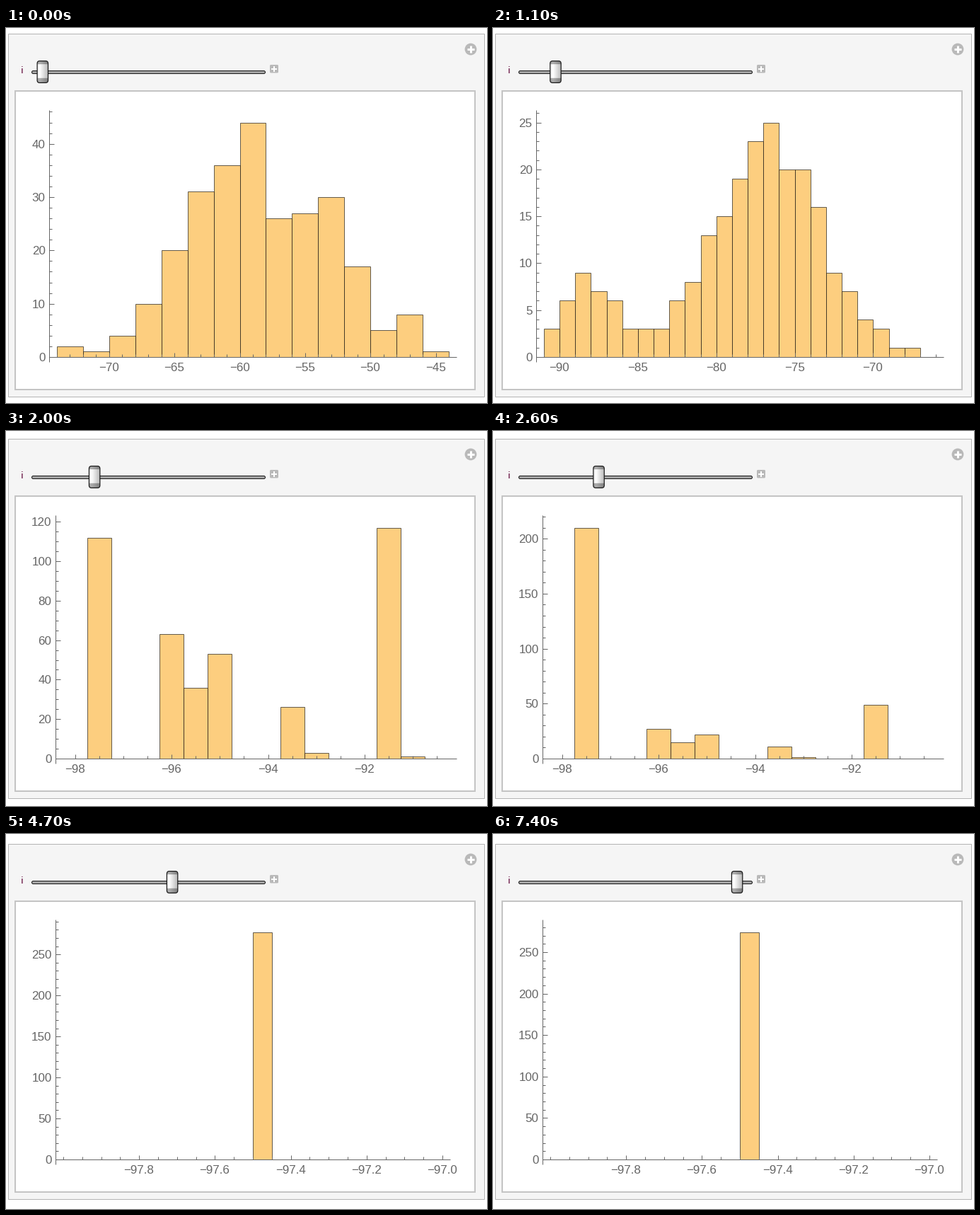
A matplotlib script for the animation above (8000 ms loop, 680 by 530 pixels).

```python
import math
import numpy as np
import matplotlib.pyplot as plt
from matplotlib.animation import FuncAnimation
from matplotlib.collections import LineCollection
from matplotlib.patches import Circle, FancyBboxPatch, Rectangle

W, H, DPI = 680, 530, 100
PX = 72 / DPI  # points per pixel
INTERVAL, FRAMES = 100, 80
LAST_STEP = 24

FILL = "#fdce7f"
EDGE = (0, 0, 0, 0.6)
AXIS = "#666666"
ICON = "#b9b9b9"

# icon centre y, plot box bottom
ROOMY, RAISED, TALL = (30, 511), (29, 512), (28, 514)
SHORT, MIDDLE, LOW = (33, 509), (32, 511), (36, 506)

fig = plt.figure(figsize=(W / DPI, H / DPI), dpi=DPI, facecolor="white")
ax = fig.add_axes([0, 0, 1, 1])


# --- histograms -----------------------------------------------------------

def hist(layout, lo, hi, width, counts, xticks, yticks, left=61, right=637, digits=0):
    return dict(layout=layout, lo=lo, hi=hi, width=width, counts=counts,
                xticks=xticks, yticks=yticks, left=left, right=right, digits=digits)


def humps(layout, lo, hi, width, peak, parts, ystep=(5, 1), jitter=0):
    """Histogram of a sum of bell curves (height, mean, spread)."""
    x = np.arange(lo, hi, width) + width / 2
    y = sum(a * np.exp(-((x - m) / s) ** 2 / 2) for a, m, s in parts)
    y = y * np.random.default_rng(4).uniform(1 - jitter, 1 + jitter, len(x))
    return hist(layout, lo, hi, width, np.rint(y * peak / y.max()), (5, 1), ystep)


def early():
    return humps(ROOMY, -74, -44, 2, 44,
                 [(36, -60.8, 3.9), (25, -53, 2), (11, -59, 0.7),
                  (8, -47, 1), (2, -73, 0.5)], (10, 2))


def sinking():
    return humps(RAISED, -88, -61, 1, 29,
                 [(25, -73, 3.4), (5, -65, 1.6), (4, -81, 1.8), (9, -76, 0.7),
                  (5, -73.5, 0.4), (3, -87.5, 0.3)])


def drifting(s):
    """Main hump moves left while a second one grows near the lower end."""
    return humps(ROOMY, round(-88 - 4 * s), round(-61 - 7 * s), 1, 27 - 3 * s,
                 [(24, -73 - 5.5 * s, 3.4), (14 * s, -88, 1.7)], jitter=0.15)


def split():
    return humps(TALL, -92, -68, 1, 24,
                 [(20, -78.5, 2.9), (17, -88.1, 1.1), (9, -85, 0.8),
                  (16, -91.5, 0.4), (9, -81.5, 0.5), (4, -78.5, 0.4), (6, -74.5, 0.4)])


def clusters(step):
    """Upper levels empty geometrically into the lowest one."""
    rest = 0.65 ** (step - 6)
    levels = {-97.5: 282 / rest - 170, -96: 63, -95.5: 36, -95: 53,
              -93.5: 26, -93: 3, -91.5: 117, -91: 1}
    last = step == 9
    lo, hi = -98.25, -94.25 if last else -90.25
    counts = np.zeros(round((hi - lo) * 2))
    for level, n in levels.items():
        if level < hi:
            counts[int((level - lo) * 2)] = round(n * rest)
    yticks = (50, 10) if counts.max() > 130 else (20, 5)
    return hist(MIDDLE if last else SHORT, lo, hi, 0.5, counts,
                (1 if last else 2, 0.5), yticks, left=70)


def single(step):
    j = (step - 10) // 5
    return hist(LOW, -98, -97, 0.05, [0] * 10 + [282 - j * (6 - j)], (0.2, 0.05),
                (50, 10), left=70, right=628, digits=1)


def hist_at(step):
    if step == 0:
        return early()
    if step == 1:
        return sinking()
    if step < 4:
        return drifting((step - 1) / 3)
    if step == 4:
        return split()
    return clusters(step) if step < 10 else single(step)


# --- drawing --------------------------------------------------------------
# Whole numbers name pixel rows and columns; thin straight lines snap to them.

def rect(x0, y0, x1, y1, face, edge, lw=1, z=1):
    ax.add_patch(Rectangle((x0, y0), x1 - x0, y1 - y0, facecolor=face,
                           edgecolor=edge, linewidth=lw * PX, zorder=z))


def rounded(x, y, w, h, r, face, edge="none", lw=0, z=1):
    box = FancyBboxPatch((x - w / 2, y - h / 2), w, h,
                         boxstyle=f"round,pad=0,rounding_size={r}",
                         facecolor=face, edgecolor=edge, linewidth=lw * PX, zorder=z)
    ax.add_patch(box)
    return box


def plus(x, y, arm, lw):
    for dx, dy in ((arm, 0), (0, arm)):
        ax.plot([x - dx, x + dx], [y - dy, y + dy], color="white", lw=lw * PX,
                solid_capstyle="butt", zorder=4)


def label(x, y, s, ha):
    ax.text(x, y, s, ha=ha, va="baseline", color=AXIS,
            family="Liberation Sans", size=17 * PX, zorder=4)


def multiples(step, lo, hi):
    first, last = math.ceil(lo / step - 1e-6), math.floor(hi / step + 1e-6)
    return [k * step for k in range(first, last + 1)]


def is_major(v, step):
    return abs(v / step - round(v / step)) < 1e-6


def number(v, digits=0):
    return f"{v:.{digits}f}".replace("-", "\u2212")


def draw_panel(icon_y, box_bottom):
    rect(3, icon_y - 22, 676, box_bottom + 10, "#f5f5f5", "#b4b4b4")
    rect(13, icon_y + 59, 663, box_bottom, "white", "#c4c4c4", lw=2)
    ax.add_patch(Circle((657, icon_y), 8.4, facecolor=ICON, edgecolor="none", zorder=3))
    plus(657, icon_y, 5, 3)
    rounded(379, icon_y + 27.7, 12, 11.5, 1.5, ICON, z=3)
    plus(379, icon_y + 27.7, 4, 2)
    ax.text(20.5, icon_y + 34, "i", family="DejaVu Sans", size=13 * PX,
            color="#5c0034", va="baseline", zorder=3)


def knob_shade():
    """Light body fading to grey on the right, with darker caps."""
    x = np.linspace(0, 1, 16)
    body = 1 - 0.27 * np.abs(x - 0.22) / 0.78
    shade = np.tile(body, (30, 1))
    shade[:5] *= 0.68
    shade[-6:] *= 0.68
    return np.dstack([shade] * 3)


KNOB = knob_shade()


def draw_slider(x, icon_y):
    rounded(201.5, icon_y + 32.5, 330, 4, 2, "#a3a3a3", "#1c1c1c", 1, z=3)
    y = icon_y + 32
    outline = rounded(x, y, 15.4, 30.8, 3.5, "none", "#161616", 1.2, z=6)
    shade = ax.imshow(KNOB, extent=(x - 7.7, x + 7.7, y + 15.4, y - 15.4),
                      aspect="auto", interpolation="bilinear", zorder=5)
    shade.set_clip_path(outline)


def draw_hist(h):
    left, right = h["left"], h["right"]
    base = h["layout"][1] - 46
    peak = max(h["counts"])
    sx = (right - left - 22) / (h["hi"] - h["lo"])
    sy = 0.5755 * (right - left) / peak
    top = round(base - sy * peak - 17.5)

    def px(v):
        return round(left + 11 + (v - h["lo"]) * sx)

    def py(v):
        return round(base - v * sy)

    for k, n in enumerate(h["counts"]):
        if n:
            x = h["lo"] + k * h["width"]
            rect(px(x), py(n), px(x + h["width"]), base, FILL, EDGE, z=2)

    lines = [[(left, base), (right, base)], [(left, top), (left, base + 7)]]

    major, minor = h["xticks"]
    for v in multiples(minor, h["lo"] - 9 / sx, h["hi"] + 9 / sx):
        x = px(v)
        labelled = is_major(v, major) and x > left + 20
        lines.append([(x, base), (x, base - (6 if labelled else 4))])
        if labelled:
            label(x - 0.5, base + 20, number(v, h["digits"]), "center")

    major, minor = h["yticks"]
    for v in multiples(minor, 0, (base - top) / sy):
        y = py(v)
        big = is_major(v, major)
        lines.append([(left, y), (left + (7 if big else 4), y)])
        if big:
            label(left - 5.5, y + 6, number(v), "right")

    ax.add_collection(LineCollection(lines, colors=AXIS, linewidths=PX, zorder=3),
                      autolim=False)


def update(frame):
    t = frame * INTERVAL
    step = 0 if t < 500 else min(LAST_STEP, 1 + (t - 500) // 300)
    h = hist_at(step)
    ax.cla()
    ax.axis("off")
    draw_panel(*h["layout"])
    draw_hist(h)
    draw_slider(51.8 + 12.22 * step, h["layout"][0])
    ax.set_xlim(0, W)
    ax.set_ylim(H, 0)
    return []


anim = FuncAnimation(fig, update, frames=FRAMES, interval=INTERVAL,
                     repeat=True, repeat_delay=0, blit=False)
plt.show()
```
